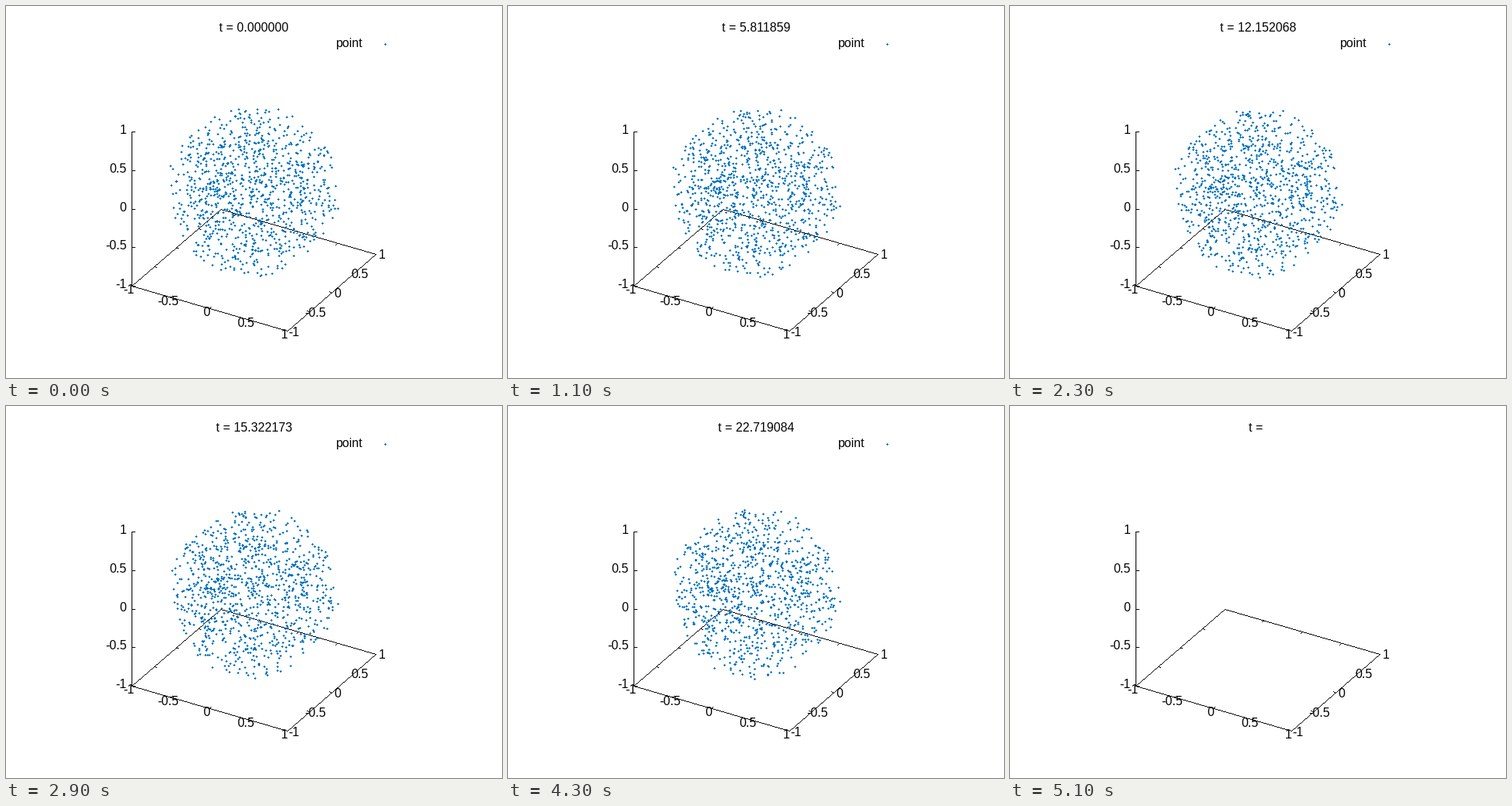
A matplotlib script that plays this animation: 640 by 480 pixels, repeating every 5.2 s.

```python
import numpy as np
import matplotlib.pyplot as plt
from matplotlib.animation import FuncAnimation
from matplotlib.collections import LineCollection

W, H, DPI = 640, 480, 100
PX = 72 / DPI
FRAMES = 52
DT = 0.5283508
CENTRE = np.array([319.5, 240.5])
RADIUS = 113
SPEED = 0.245  # pixels per frame
BLUE = "#0072bd"

plt.rcParams["font.family"] = "Liberation Sans"
plt.rcParams["font.size"] = 16 * PX
plt.rcParams["text.hinting"] = "default"

fig = plt.figure(figsize=(W / DPI, H / DPI), dpi=DPI, facecolor="white")
ax = fig.add_axes([0, 0, 1, 1])
ax.set_xlim(0, W)
ax.set_ylim(H, 0)
ax.axis("off")

# Projected corners of the axes and small tick vectors
TOP, LEFT = np.array([162, 162]), np.array([162, 361])
FRONT, RIGHT, BACK = np.array([363, 419]), np.array([477, 320]), np.array([277, 262])
X_TICK, Y_TICK, Z_TICK = np.array([3, 1]), np.array([2, -2]), np.array([4, 0])


def add_strokes(segments, color, zorder):
    """Pixel-wide strokes kept exactly on the pixel grid."""
    strokes = LineCollection(segments, colors=color, linewidths=PX,
                             capstyle="butt", zorder=zorder)
    strokes.set_snap(False)
    ax.add_collection(strokes, autolim=False)
    return strokes


def bars(x, y, reach=0):
    """Horizontal bars around whole pixels, reaching out to both sides."""
    ends = np.stack([x - reach, y + 0.5, x + 1 + reach, y + 0.5], axis=1)
    return ends.reshape(-1, 2, 2)


def line(a, b):
    """A stepped line without smoothing, one pixel per step."""
    a, b = np.round(a), np.round(b)
    steps = int(np.abs(b - a).max()) + 1
    x, y = np.floor(np.linspace(a, b, steps) + 0.5).T
    add_strokes(bars(x, y), "black", 1)


def plus_marks(points):
    """Three-pixel plus signs centred on whole pixels."""
    x, y = np.round(points).T
    upright = bars(y, x, reach=1)[:, :, ::-1]
    return np.concatenate([bars(x, y, reach=1), upright])


def label(x, baseline, text, ha="center"):
    return ax.text(x, baseline, text, ha=ha, va="baseline", color="black", zorder=3)


def draw_axes():
    for a, b in [(LEFT, TOP), (LEFT, FRONT), (FRONT, RIGHT), (LEFT, BACK), (BACK, RIGHT)]:
        line(a, b)
    for f in np.linspace(0, 1, 5):
        text = f"{2 * f - 1:g}"
        x = LEFT + (FRONT - LEFT) * f
        y = FRONT + (RIGHT - FRONT) * f
        z = LEFT + (TOP - LEFT) * f
        back_x = BACK + (RIGHT - BACK) * f
        back_y = LEFT + (BACK - LEFT) * f
        for spot, tick in [(x, Y_TICK), (back_x, -Y_TICK), (y, -X_TICK),
                           (back_y, X_TICK), (z, Z_TICK)]:
            line(spot, spot + tick)
        label(x[0] - 3.5, x[1] + 10, text)
        label(y[0] + 8, y[1] + 6.5, text)
        label(155.5, round(z[1]) + 3, text, "right")


def on_sphere(rng, n):
    v = rng.normal(size=(n, 3))
    return v / np.linalg.norm(v, axis=1, keepdims=True)


def make_cloud(n=1000):
    """Particles of a uniform ball, seen flat, each with a steady drift."""
    rng = np.random.default_rng(7)
    ball = on_sphere(rng, n) * np.cbrt(rng.random((n, 1))) * RADIUS
    pos = ball[:, :2]
    drift = on_sphere(rng, n)[:, :2] * SPEED
    leaves = np.hypot(*(pos + drift * FRAMES).T) > RADIUS
    drift[leaves] *= -1
    return pos + CENTRE, drift


draw_axes()
start, drift = make_cloud()
title = label(320, 33, "")
key_text = label(461, 53, "point", "right")
key_mark = add_strokes(plus_marks(np.array([[489, 49]])), BLUE, 2)
particles = add_strokes(plus_marks(start), BLUE, 2)


def update(i):
    running = i < FRAMES - 1
    for artist in (key_text, key_mark, particles):
        artist.set_visible(running)
    title.set_text(f"t = {i * DT:.6f}" if running else "t =")
    title.set_x(320 if running else 317.5)
    particles.set_segments(plus_marks(start + drift * i))
    return title, key_text, key_mark, particles


anim = FuncAnimation(fig, update, frames=FRAMES, interval=100, repeat=True, blit=False)
plt.show()
```
